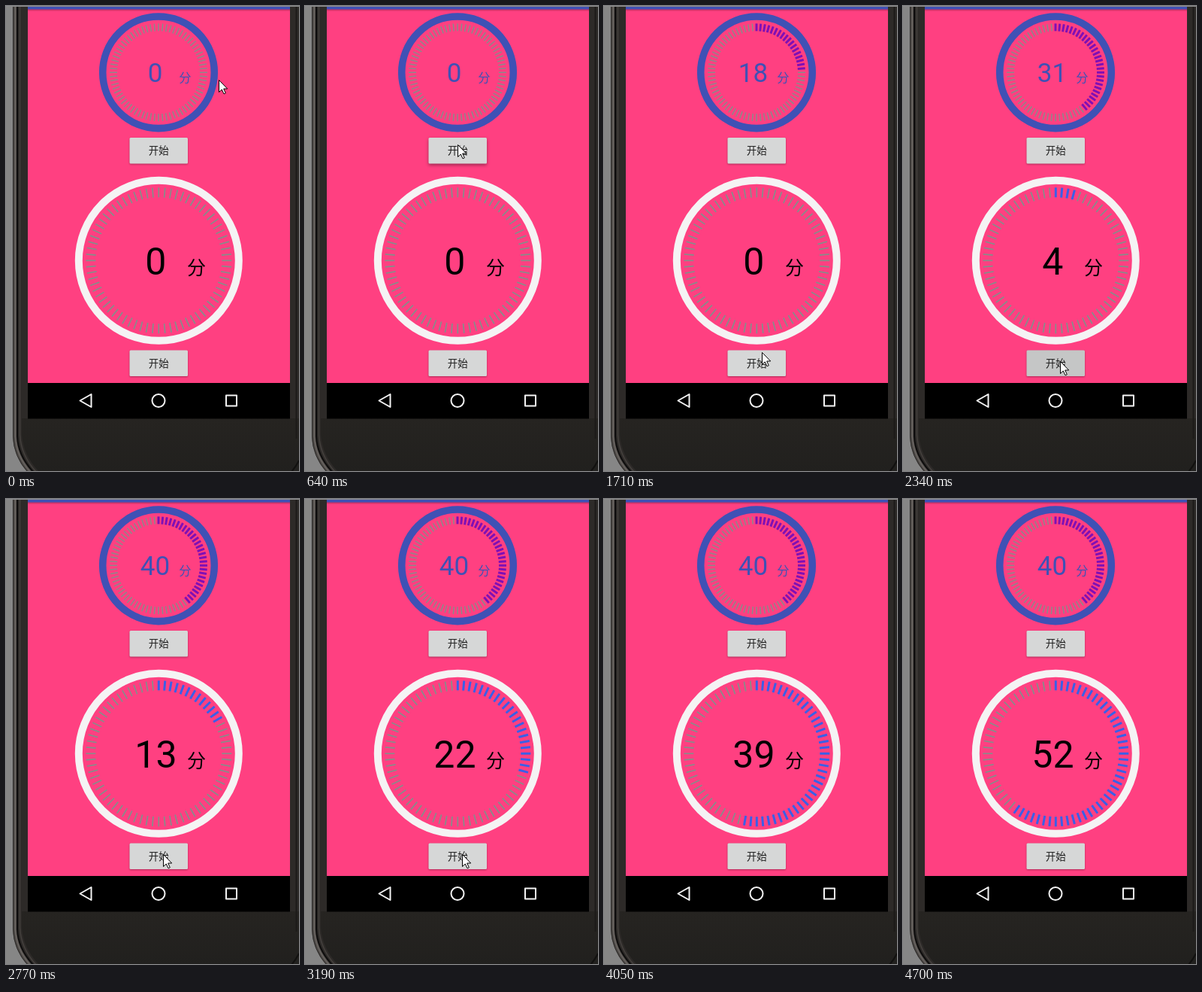
An HTML page for the animation above (4.8 s loop, 390 px wide and 618 px high).

```html
<!DOCTYPE html>
<html lang="zh">
<head>
<meta charset="utf-8">
<title>Dial timers</title>
<style>
html, body { margin: 0; width: 100%; height: 100%; overflow: hidden; background: #868686; }
svg { display: block; width: 390px; height: 618px; }
text { text-anchor: middle; }
.num { font-family: Roboto, sans-serif; }
.zh { font-family: "Noto Sans CJK SC", "Noto Sans CJK", "Noto Sans CJK JP", sans-serif; }
.rest { filter: drop-shadow(0 1px 1px rgba(0,0,0,.32)); }
.raised { filter: drop-shadow(0 2.5px 2px rgba(0,0,0,.38)); }
</style>
</head>
<body>
<svg id="stage" viewBox="0 0 390 618" xmlns="http://www.w3.org/2000/svg">
  <defs>
    <linearGradient id="chin" x1="0" y1="0" x2="0" y2="1">
      <stop offset="0" stop-color="#262421"/>
      <stop offset="1" stop-color="#21201e"/>
    </linearGradient>
    <linearGradient id="barShade" x1="0" y1="0" x2="0" y2="1">
      <stop offset="0" stop-color="#000" stop-opacity=".25"/>
      <stop offset="1" stop-color="#000" stop-opacity="0"/>
    </linearGradient>
  </defs>
  <rect width="390" height="618" fill="#868686"/>
  <g fill="none">
    <path d="M9 0V572Q10 599 29 620H390V0Z" fill="#4f4b48"/>
    <path d="M9.5 0V572Q10.500 599 29.500 620" stroke="#2b2928"/>
    <path d="M12.500 0V572Q13.500 598 33 620" stroke="#6a6562" stroke-width="1.500"/>
    <path d="M15 0V572Q16 598 37 620H390V0Z" fill="#2d2a28"/>
    <path d="M15 0V572Q16 598 37 620" stroke="#0d0c0c" stroke-width="2"/>
    <path d="M18.500 0V570Q20 598 41 620" stroke="#45413e" stroke-width="1.500"/>
    <path d="M21 548V570Q23 598 45 620H390V548Z" fill="url(#chin)"/>
    <path d="M390 604Q386 612 380 619" stroke="#11100f" stroke-width="2"/>
    <path d="M386.500 0V575" stroke="#1c1a19" stroke-width="2"/>
  </g>
  <rect x="29" y="0" width="349" height="502" fill="#ff4081"/>
  <rect x="29" y="0" width="349" height="4.500" fill="#3f51b5"/>
  <rect x="29" y="4.500" width="349" height="3" fill="url(#barShade)"/>
  <rect width="390" height="1" fill="#8c8c8c"/>
  <rect x="29" y="501" width="349" height="47.500" fill="#000"/>
  <g fill="none" stroke="#f4f4f4" stroke-width="2" stroke-linejoin="round">
    <path d="M98.500 524.500L113.500 516V533Z"/>
    <circle cx="203" cy="524.500" r="8.500"/>
    <rect x="293" y="517.500" width="14" height="14"/>
  </g>
</svg>
<script>
const NS = 'http://www.w3.org/2000/svg';
const stage = document.getElementById('stage');
const LOOP = 4800, TICKS = 72;

function add(tag, attrs, text) {
  const el = document.createElementNS(NS, tag);
  for (const k in attrs) el.setAttribute(k, attrs[k]);
  if (text) el.textContent = text;
  return stage.appendChild(el);
}

function makeDial(d) {
  add('circle', { cx: d.cx, cy: d.cy, r: d.r, fill: 'none', stroke: d.ring, 'stroke-width': d.band });
  const ticks = Array.from({ length: TICKS }, (_, i) => add('line', {
    x1: d.cx, x2: d.cx, y1: d.cy - d.outer, y2: d.cy - d.inner,
    transform: `rotate(${i * 360 / TICKS} ${d.cx} ${d.cy})`
  }));
  const label = add('text', { class: 'num', x: d.numX, y: d.base, 'font-size': d.size, fill: d.ink });
  add('text', { class: 'zh', x: d.unitX, y: d.base, 'font-size': d.unit, fill: d.ink }, '分');
  return t => {
    const n = Math.max(0, Math.min(d.goal, Math.round((t - d.start) * d.rate)));
    label.textContent = n;
    ticks.forEach((tick, i) => {
      const lit = i < n && i <= TICKS * d.goal / 100;
      tick.setAttribute('stroke', lit ? d.lit : '#8a8a8a');
      tick.setAttribute('stroke-width', lit ? 3 : d.thin);
    });
  };
}

function makeButton(y) {
  const box = add('rect', { x: 164.5, y, width: 77.5, height: 34.5, rx: 1.5 });
  add('text', { class: 'zh', x: 203.3, y: y + 22.2, 'font-size': 13.5, fill: '#1f1f1f' }, '开始');
  return (raised, dark) => {
    box.setAttribute('class', raised ? 'raised' : 'rest');
    box.setAttribute('fill', dark ? '#c5c6c6' : '#d6d7d7');
  };
}

const smallDial = makeDial({
  cx: 203, cy: 88.3, r: 74.3, band: 9.6, ring: '#3f51b5', outer: 65, inner: 55, thin: 1.5,
  lit: '#8010b4', ink: '#3f51b5', numX: 198.5, base: 101, size: 35, unitX: 238.5, unit: 16.3,
  goal: 40, start: 808, rate: .0202
});
const smallButton = makeButton(175);
const bigDial = makeDial({
  cx: 203.3, cy: 338.3, r: 106.5, band: 10, ring: '#f5f3f4', outer: 97, inner: 84, thin: 1.8,
  lit: '#3a5fe8', ink: '#000', numX: 199.4, base: 357, size: 50, unitX: 253.5, unit: 25,
  goal: 60, start: 2130, rate: .0203
});
const bigButton = makeButton(457.5);
const cursor = add('path', {
  d: 'M.5 .5V16.500L4.300 13L7 18.800L9.300 17.800L6.700 12H11.700Z',
  fill: '#fff', stroke: '#000', 'stroke-width': 1
});

const steps = [0, 220, 430, 640, 1070, 1280, 1500, 1710, 1920, 2130, 2340,
  2560, 2770, 2980, 3190, 3400, 3620, 3830, 4050, 4260, 4480, 4700];
// time, x, y; no position means hidden
const pointer = [[0, 283, 98], [220, 211, 177], [430, 203, 184], [1280, 207, 254],
  [1500, 209, 398], [1710, 210, 460], [1920, 209, 472], [3400, 328, 553],
  [3620, 331, 577], [3830]];

function draw(time) {
  const t = steps.findLast(s => s <= time);
  smallDial(t);
  bigDial(t);
  smallButton(t === 640, false);
  bigButton(t === 2130, t === 2340);
  const [, x, y] = pointer.findLast(p => p[0] <= t);
  cursor.setAttribute('visibility', x === undefined ? 'hidden' : 'visible');
  if (x !== undefined) cursor.setAttribute('transform', `translate(${x} ${y})`);
}

const began = performance.now();
function loop() {
  draw((performance.now() - began) % LOOP);
  requestAnimationFrame(loop);
}
loop();
</script>
</body>
</html>
```
